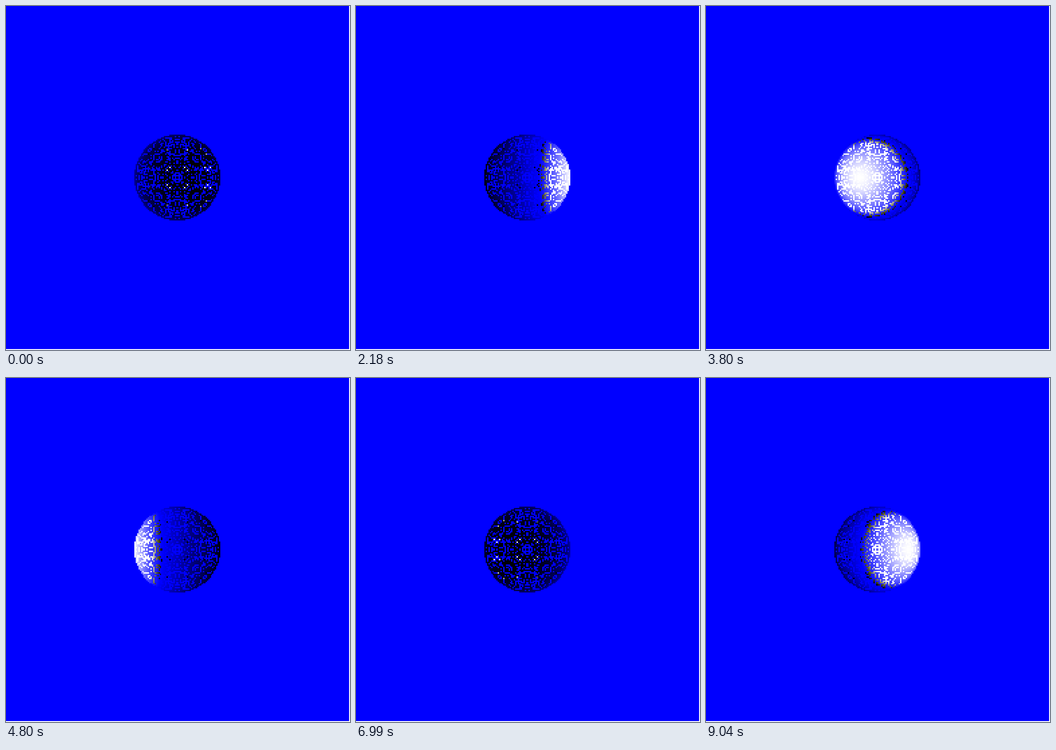
These frames come from a looping animation (748x749 px, 9.13 s). An HTML page with a canvas:

```html
<!DOCTYPE html>
<html lang="en">
<head>
<meta charset="utf-8">
<title>Speckled sphere with an orbiting light</title>
<style>
  html, body { margin: 0; width: 100%; height: 100%; overflow: hidden; background: #fff; }
  canvas { display: block; }
</style>
</head>
<body>
<canvas id="stage" width="748" height="749"></canvas>
<script>
const LOOP = 9130;
const SIZE = 64;            // sphere diameter in coarse pixels
const CAMERA = 6;           // distances in sphere radii
const LIGHT = 2;
const START_ANGLE = 3.45;   // the light turns by one radian per second

const stage = document.getElementById('stage').getContext('2d');
const coarse = document.createElement('canvas');
coarse.width = coarse.height = SIZE;
const ctx = coarse.getContext('2d');
const image = ctx.createImageData(SIZE, SIZE);
stage.imageSmoothingEnabled = false;

const clamp = v => Math.max(0, Math.min(1, v));

// Repeatable noise in 0..1 for a pair of whole numbers
function noise(a, b) {
  let h = Math.imul(a + 11, 374761393) ^ Math.imul(b + 5, 668265263);
  h = Math.imul(h ^ (h >>> 13), 1274126177);
  h = Math.imul(h ^ (h >>> 15), 2246822519);
  return ((h ^ (h >>> 16)) >>> 0) / 4294967296;
}

// Distances from the centre, mirrored into all four quadrants
const sparks = new Set([
  '5.5,7.5', '7.5,5.5', '7.5,20.5', '20.5,7.5',
  '22.5,5.5', '24.5,7.5', '17.5,21.5', '21.5,17.5'
]);

// Eightfold symmetric speckle: 0 smooth, 1 speckle, 2 spark
function speckle(x, y) {
  x = Math.abs(x);
  y = Math.abs(y);
  if (sparks.has(x + ',' + y)) return 2;
  const a = Math.min(x, y), b = Math.max(x, y);
  const r = Math.hypot(a, b);
  if (r < 4.1) return a === 1.5 || b === 1.5 || r > 3.1 ? 1 : 0;
  const corner = Math.hypot(a - 14.5, b - 14.5);
  let density = 0.36;
  if (r > 30.8) density = 0;
  else if (r < 7) density = 0.22;
  else if (corner < 4.3) density = Math.floor(corner) % 2 ? 0.6 : 0.15;
  else if (corner < 6.5 && r < 21) density = 0.08;
  return noise(a - 0.5, b - 0.5) < density ? 1 : 0;
}

// Surface normals seen by a perspective camera
const cells = [];
for (let row = 0; row < SIZE; row++) {
  for (let col = 0; col < SIZE; col++) {
    const x = col + 0.5 - SIZE / 2, y = row + 0.5 - SIZE / 2;
    const rr = (x * x + y * y) / (SIZE * SIZE / 4);
    if (rr >= 1) continue;
    const spread = CAMERA * CAMERA - 1;
    const depth = (CAMERA - Math.sqrt(1 - rr)) / (1 + rr / spread);
    cells.push({
      offset: 4 * (row * SIZE + col),
      nx: x / (SIZE / 2) / Math.sqrt(spread) * depth,
      nz: CAMERA - depth,
      kind: speckle(x, y)
    });
  }
}

// d is the cosine between the normal and the direction to the light
function shade(kind, d) {
  if (kind === 0) return [clamp(d), clamp(d), clamp(1 + d)];
  if (kind === 2 && d < 0) {
    const v = -d - 0.78;
    return [clamp(6 * v), clamp(6 * v), clamp(7 * v - 0.2)];
  }
  return d < 0 ? [0, 0, 1] : [clamp(3.8 * d), clamp(3.8 * d), clamp(6 * d - 0.5)];
}

function draw(now) {
  const angle = START_ANGLE - (now % LOOP) / 1000;
  const lx = LIGHT * Math.sin(angle), lz = LIGHT * Math.cos(angle);
  for (const { offset, nx, nz, kind } of cells) {
    const facing = nx * lx + nz * lz;
    const d = (facing - 1) / Math.sqrt(1 + LIGHT * LIGHT - 2 * facing);
    const [r, g, b] = shade(kind, d);
    image.data[offset] = 255 * r;
    image.data[offset + 1] = 255 * g;
    image.data[offset + 2] = 255 * b;
    image.data[offset + 3] = 255;
  }
  ctx.putImageData(image, 0, 0);
  // A thin white edge stays free at the right and the bottom
  stage.fillStyle = '#00f';
  stage.fillRect(0, 0, 746, 747);
  stage.drawImage(coarse, 279, 280, 187, 187);
}

const begin = performance.now();
function tick() {
  draw(performance.now() - begin);
  requestAnimationFrame(tick);
}
tick();
</script>
</body>
</html>
```
